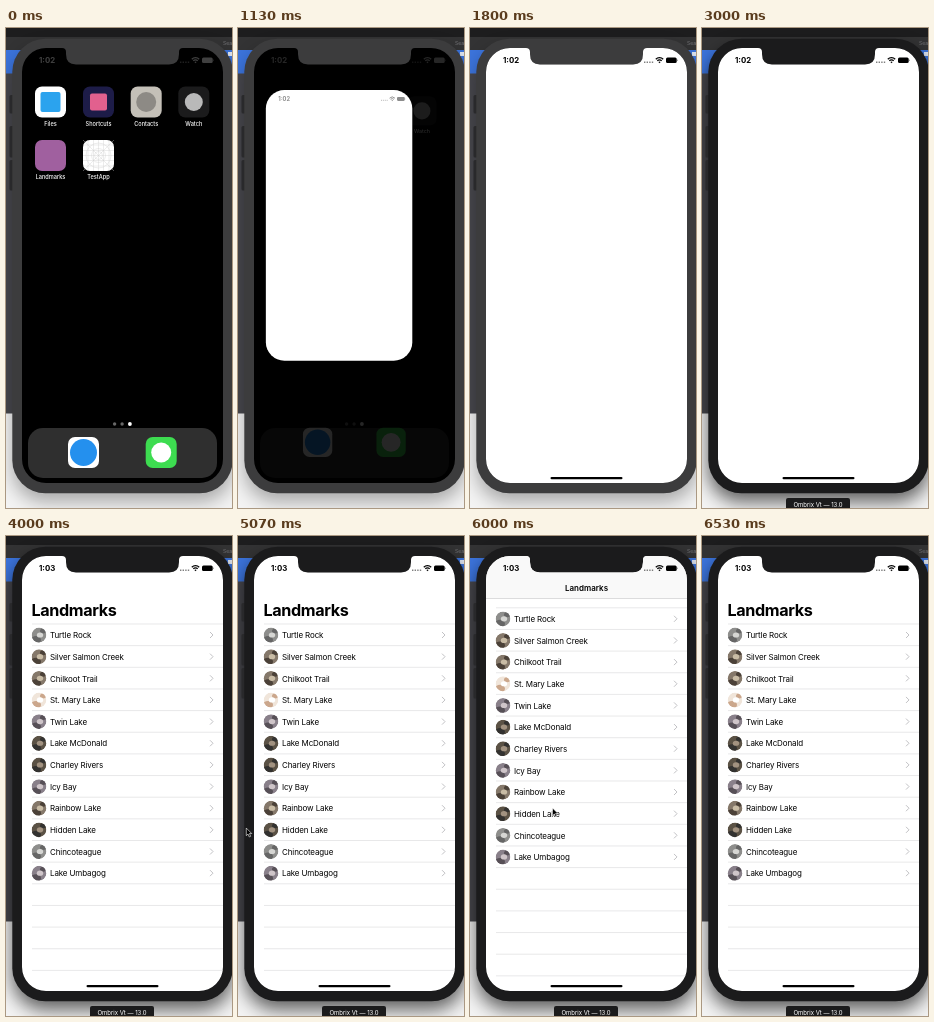
Recreate the animation shown at these times as an HTML page. Size 226 px wide and 480 px high, loop 6870 ms.

```html
<!DOCTYPE html>
<html lang="en">
<head>
<meta charset="utf-8">
<title>App launch and list scroll</title>
<style>
  html, body { margin: 0; width: 100%; height: 100%; overflow: hidden; background: #f0f0f0; }
  svg { display: block; width: 100%; height: 100%; font-family: Inter, "Liberation Sans", sans-serif; }
  .row { font-size: 8px; letter-spacing: -.12px; }
  .time { font-size: 7.8px; font-weight: 700; }
  .label { font-size: 5.6px; font-weight: 500; fill: #fff; text-anchor: middle; }
  .large { font-size: 16.2px; font-weight: 700; letter-spacing: -.4px; }
  .inline { font-size: 8px; font-weight: 600; text-anchor: middle; }
</style>
</head>
<body>
<svg id="stage" viewBox="0 0 226 480" preserveAspectRatio="none">
  <defs>
    <path id="screenShape" d="M40 20H56q4 0 4 4v2q0 10.500 10 10.500H163q10 0 10-10.500v-2q0-4 4-4H193a24 24 0 0 1 24 24V431a24 24 0 0 1-24 24H40a24 24 0 0 1-24-24V44a24 24 0 0 1 24-24z"/>
    <clipPath id="screen"><use href="#screenShape"/></clipPath>
    <clipPath id="round"><circle r="7.4"/></clipPath>
    <filter id="blur" x="-30%" y="-30%" width="160%" height="160%"><feGaussianBlur stdDeviation="9"/></filter>
    <g id="grid" fill="none" stroke="#cfcfcf" stroke-width=".4">
      <path d="M5 0V31M10.5 0V31M15.5 0V31M20.5 0V31M26 0V31M0 5H31M0 10.5H31M0 15.5H31M0 20.5H31M0 26H31M0 0L31 31M31 0L0 31"/>
      <circle cx="15.5" cy="15.5" r="12.5"/><circle cx="15.5" cy="15.5" r="7"/><circle cx="15.5" cy="15.5" r="4"/>
    </g>
    <g id="signal">
      <path d="M158 13.5h1.4v1.4h-1.4zm2.6 0h1.4v1.4h-1.4zm2.6 0h1.4v1.4h-1.4zm2.6 0h1.4v1.4h-1.4z" opacity=".5"/>
      <g fill="none" stroke="currentColor" stroke-width="1.3">
        <path d="M169.8 11.2a5.2 5.2 0 0 1 7.4 0M171.3 12.8a3.1 3.1 0 0 1 4.4 0"/>
      </g>
      <path d="M173.5 15.3l-1.1-1.2a1.6 1.6 0 0 1 2.2 0z"/>
      <rect x="180" y="9.5" width="10.700" height="5.400" rx="1.500"/>
      <path d="M191.2 11.3q1 .9 0 1.9z"/>
    </g>
  </defs>

  <rect width="226" height="480" fill="#f3f3f3"/>
  <rect width="226" height="385.500" fill="#48484e"/>
  <rect width="226" height="22" fill="#333334"/>
  <rect width="226" height="9" fill="#1d1d1e"/>
  <rect y="22" width="226" height="23.5" fill="#3c74dc"/>
  <rect x="222" y="24" width="4" height="4" fill="#dfe6f2"/>
  <text x="217" y="17" font-size="5" fill="#77777a">Sear</text>
  <rect id="shadow" x="6" y="20" width="221" height="454" rx="33" filter="url(#blur)"/>
  <path d="M7 67H5q-1.500 0-1.500 1.500V84q0 1.500 1.500 1.500H7zM7 98H5q-1.500 0-1.500 1.500V128q0 1.500 1.500 1.500H7zM7 132H5q-1.500 0-1.500 1.500V161q0 1.500 1.500 1.500H7z" fill="#29292b"/>
  <rect id="bezel" x="6.300" y="10.800" width="220.400" height="454.400" rx="33"/>
  <use href="#screenShape"/>

  <g clip-path="url(#screen)">
    <g id="home">
      <g id="homeStatus" transform="translate(16 20)" fill="#fff" color="#fff">
        <text class="time" x="17" y="14.8">1:02</text><use href="#signal"/>
      </g>
      <rect x="22" y="400" width="189" height="50" rx="15" fill="#2f2f2f"/>
      <g id="icons"></g>
      <g fill="#686868"><circle cx="108.600" cy="396" r="1.700"/><circle cx="116.100" cy="396" r="1.700"/></g>
      <circle cx="123.900" cy="396" r="1.900" fill="#fff"/>
      <rect id="press" x="77" y="112" width="31" height="31" rx="7" opacity="0"/>
    </g>

    <g id="app">
      <rect id="pane" fill="#fff"/>
      <use id="paneGrid" href="#grid"/>
      <g id="content">
        <g id="list"></g>
        <g id="bar"><rect x="16" y="20" width="201" height="42.300" fill="#f9f9f9" opacity=".97"/>
          <path d="M16 62.500H217" stroke="#c6c6c8" stroke-width=".6"/></g>
        <text id="inline" class="inline" x="116.500" y="54.900">Landmarks</text>
      </g>
      <g id="appStatus" color="#000"><text id="clock" class="time" x="17" y="14.800"></text><use href="#signal"/></g>
      <rect id="indicator" x="80.500" y="448.900" width="72" height="2.400" rx="1.200"/>
    </g>
  </g>

  <g id="tag">
    <rect x="84" y="470" width="64" height="14" rx="2" fill="#1b1b1c"/>
    <text x="116" y="479" font-size="6" fill="#fff" text-anchor="middle">Ombrix Vt — 13.0</text>
  </g>
  <path id="cursor" d="M0 0V7.600L1.800 6L3 8.900L4.400 8.300L3.200 5.500H5.500z" stroke="#fff" stroke-width=".6"/>
</svg>

<script>
const LOOP = 6870, STEP = 1000 / 15, ROW = 21.65;
const $ = id => document.getElementById(id);
const set = (id, attrs) => { for (const k in attrs) $(id).setAttribute(k, attrs[k]); };
const clamp = v => Math.max(0, Math.min(1, v));
const ramp = (t, a, b) => clamp((t - a) / (b - a));
const mix = (a, b, p) => a + (b - a) * p;
const rest = x => x <= 0 ? 1 : (1 + x) * Math.exp(-x);   // critically damped spring

// Home screen: x, y, label, tile colour, inner shape
const disc = (r, c) => `<circle cx="15.5" cy="15.5" r="${r}" fill="${c}"/>`;
const box = (s, c) => `<rect x="${15.5 - s / 2}" y="${15.5 - s / 2}" width="${s}" height="${s}" rx="2" fill="${c}"/>`;
$('icons').innerHTML = [
  [29, 58.5, 'Files', '#fff', box(20, '#2ba3ee')],
  [77, 58.5, 'Shortcuts', '#1d1c48', box(17, '#e2608e')],
  [124.7, 58.5, 'Contacts', '#c4c0b8', disc(10, '#8d8a85')],
  [172.3, 58.5, 'Watch', '#1b1b1c', disc(9, '#b9b9b9')],
  [29, 112, 'Landmarks', '#a0609f', ''],
  [77, 112, 'TestApp', '#fff', '<use href="#grid"/>'],
  [62, 409, '', '#fff', disc(13.5, '#2490ee')],
  [139.7, 409, '', '#3ddc50', disc(10, '#fff')]
].map(([x, y, name, tile, art]) => `<g transform="translate(${x} ${y})">
  <rect width="31" height="31" rx="7" fill="${tile}"/>${art}
  <text class="label" x="15.5" y="39.2">${name}</text></g>`).join('');

// Thumbnail tones: base, dark patch, light patch
const tones = {
  grey: ['#8e8e8c', '#666666', '#d6d6d3'],
  brown: ['#85786a', '#4b4138', '#c9bca5'],
  pale: ['#f0e5da', '#cba78c', '#ffffff'],
  dusk: ['#89808a', '#575057', '#cfc5c9'],
  dark: ['#5b5245', '#333230', '#a29280']
};
const places = [
  ['Turtle Rock', 'grey'], ['Silver Salmon Creek', 'brown'], ['Chilkoot Trail', 'brown'],
  ['St. Mary Lake', 'pale'], ['Twin Lake', 'dusk'], ['Lake McDonald', 'dark'],
  ['Charley Rivers', 'dark'], ['Icy Bay', 'dusk'], ['Rainbow Lake', 'brown'],
  ['Hidden Lake', 'dark'], ['Chincoteague', 'grey'], ['Lake Umbagog', 'dusk']
];
const thumb = ([base, low, high]) => `<g transform="translate(33 0)" clip-path="url(#round)">
  <circle r="7.4" fill="${base}"/><ellipse cx="-3" cy="5" rx="5" ry="4" fill="${low}"/>
  <ellipse cx="4" cy="-4" rx="3" ry="2.500" fill="${low}"/><ellipse cx="1" cy="0" rx="3.200" ry="2.600" fill="${high}"/></g>`;
const line = i => `<path d="M26 ${88 + i * ROW}H217" stroke="#d8d8da" stroke-width=".6"/>`;
$('list').innerHTML = '<text id="large" class="large" x="25.600" y="80.400">Landmarks</text>' +
  Array.from({ length: 20 }, (_, i) => line(i)).join('') +
  places.map(([name, tone], i) => `<g transform="translate(0 ${99 + i * ROW})">${thumb(tones[tone])}
    <text class="row" x="44" y="3.200">${name}</text>
    <path d="M204 -3L207 0L204 3" fill="none" stroke="#c2c2c5" stroke-width="1"/></g>`).join('');

// Pointer waypoints: time, x, y
const trail = [[5066, 8, 292], [5200, 62, 303], [5370, 106, 306], [5533, 108.5, 270.5],
  [5740, 105, 266], [6000, 82.5, 272], [6200, 59, 267], [6467, 7, 242]];

function pointer(t) {
  const i = trail.findIndex(p => p[0] > t);
  if (i < 1) return trail[i < 0 ? trail.length - 1 : 0].slice(1);
  const [a, b] = [trail[i - 1], trail[i]], p = ramp(t, a[0], b[0]);
  return [mix(a[1], b[1], p), mix(a[2], b[2], p)];
}

function scrollAt(t) {
  if (t >= 6530) return 0;
  return t < 5740 ? 46 * (1 - (1 - ramp(t, 5370, 5740)) ** 3) : 46 * rest((t - 5740) * .0085);
}

function launch(t) {
  const edge = (from, to, w) => t >= 1800 ? to : mix(to, from, rest((t - 900) * w));
  const l = edge(77, 16, .013), top = edge(112, 20, .0078);
  const w = edge(108, 217, .0088) - l, h = edge(143, 455, .0088) - top;
  const p = (w - 31) / 170;
  set('pane', { x: l, y: top, width: w, height: h, rx: t >= 1800 ? 0 : mix(7, 24, p) });
  set('paneGrid', { transform: `translate(${l} ${top}) scale(${w / 31} ${h / 31})`, opacity: clamp(1 - p * 1.8) });
  set('appStatus', { transform: `translate(${l} ${top}) scale(${w / 201})`, opacity: ramp(p, .5, .9) });
  set('app', { opacity: t < 900 ? 0 : 1 });
  const s = mix(1, .92, p);
  set('home', { opacity: clamp(1 - p * 1.25) });
  set('icons', { transform: `translate(116.500 237.500) scale(${s}) translate(-116.500 -237.500)` });
  set('press', { opacity: .5 * ramp(t, 700, 790) });
}

function draw(t) {
  launch(t);
  set('homeStatus', { opacity: mix(.25, 1, ramp(t, 0, 267)) });

  const active = t >= 2060;
  set('bezel', { fill: active ? '#1b1b1c' : '#3c3c3d' });
  set('shadow', { opacity: active ? .6 : .3 });
  set('tag', { opacity: active ? 1 : 0 });
  set('indicator', { opacity: ramp(t, 1500, 1750) });
  $('clock').textContent = t < 3860 ? '1:02' : '1:03';

  const title = ramp(t, 5500, 5605) - ramp(t, 6080, 6250);
  set('content', { opacity: ramp(t, 3000, 3350) });
  set('list', { transform: `translate(0 ${-scrollAt(t)})` });
  set('bar', { opacity: ramp(t, 5430, 5510) - ramp(t, 6080, 6220) });
  set('inline', { opacity: title });
  set('large', { opacity: 1 - title });

  set('cursor', { transform: `translate(${pointer(t)})`, opacity: t >= 5060 && t < 6525 ? 1 : 0 });
}

const start = performance.now();
function tick() {
  const t = (performance.now() - start) % LOOP;
  draw(Math.floor(t / STEP + .06) * STEP);   // 15 pictures per second
  requestAnimationFrame(tick);
}
tick();
</script>
</body>
</html>
```
